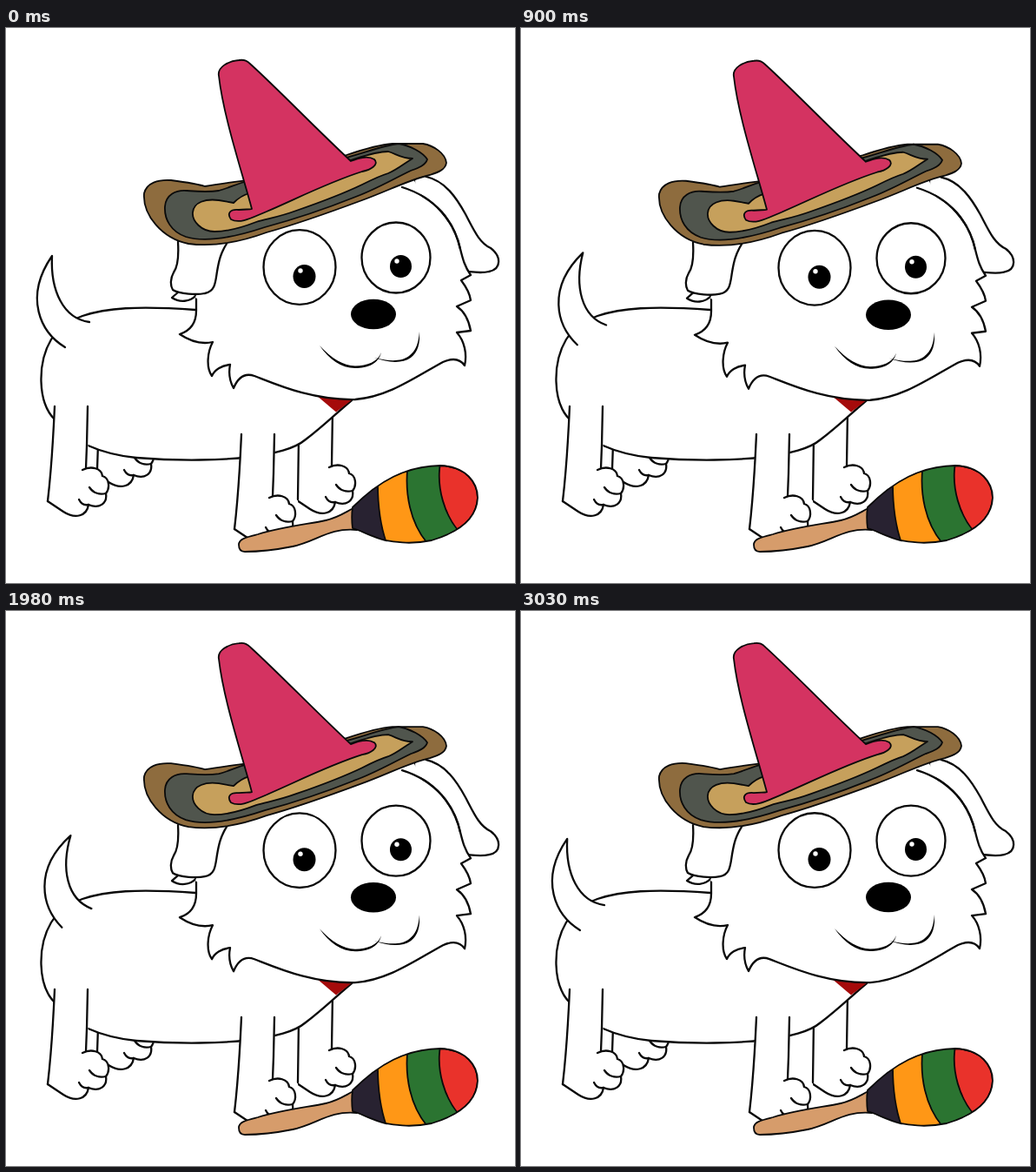
An HTML page that plays this animation: 586 px wide and 638 px high, repeating every 3060 ms.

```html
<!DOCTYPE html>
<html lang="en">
<head>
<meta charset="utf-8">
<title>Dog with sombrero</title>
<style>
html, body { margin: 0; width: 100%; height: 100%; overflow: hidden; background: #fff; }
svg { display: block; width: 586px; height: 638px; }
</style>
</head>
<body>
<svg viewBox="0 0 586 638" fill="#fff" stroke="#0a0a0a" stroke-width="2.3" stroke-linejoin="round" stroke-linecap="round">
  <defs>
    <g id="foot">
      <path d="M48 544L66 556C80 565 93 561 95 548C107 553 117 547 115 535C120 529 119 517 111 515C110 506 98 503 88 508"/>
      <path fill="none" d="M95 548C90 549 86 546 84 542M115 535C107 537 100 534 96 528"/>
    </g>
    <g id="leg">
      <path stroke="none" d="M56 434L48 544 95 540 94 434Z"/>
      <use href="#foot"/>
      <path fill="none" d="M56 435C54 480 52 510 48 544M94 435L93 480 92 506"/>
    </g>
    <path id="bulb" d="M399 551C430 520 460 504 500 503C530 504 543 523 543 540C542 565 520 580 490 589C465 594 450 591 437 589C420 585 410 578 399 575C398 567 398 558 399 551Z"/>
    <clipPath id="inside"><use href="#bulb"/></clipPath>
  </defs>

  <!-- far legs -->
  <use href="#foot" x="52" y="-34"/>
  <path d="M106 478L105 507"/>
  <path stroke="none" d="M337 470L336 541 378 530 376 440Z"/>
  <use href="#foot" x="284" y="-3"/>
  <path stroke="none" d="M330 530H336V545H330Z"/>
  <path fill="none" d="M337 470L336 542M376 440L375 503"/>

  <!-- body -->
  <path d="M218 324C150 319 115 322 88 331C70 338 59 347 52 358C36 385 36 430 56 450C70 474 110 490 150 494C200 498 250 497 280 493C310 489 332 484 345 473C365 458 380 443 398 428"/>
  <path fill="#a50b0b" stroke="none" d="M357 422L380 441.500 399 427V420Z"/>
  <path id="tail" d="M68 367C40 350 20 310 53 262C51 302 66 334 96 338"/>
  <use href="#leg"/>
  <use href="#leg" x="215" y="32"/>

  <g id="head">
    <path d="M470 160L484 171C506 176 519 196 529 214C539 233 545 247 558 253C570 262 571 277 556 280C548 282 541 281 532 280L470 200Z"/>
    <path d="M199 303L191 310C200 316 212 315 219 307"/>
    <path d="M456 183C495 195 516 223 523 254C526 266 528 274 535 284L524 290C530 298 534 305 535 313L519 320C528 326 533 337 535 348L519 350C528 360 531 375 528 388C522 379 512 380 503 384C470 402 440 424 402 427C352 428 312 410 286 400C275 396 267 402 262 414C257 405 256 397 258 387C248 388 240 393 237 400C230 390 232 372 238 361C225 364 212 360 200 352C212 348 219 340 219 325V307"/>
    <path stroke="none" d="M218 310L240 240 458 150 510 260 400 400Z"/>
    <path fill="none" d="M456 183C495 195 516 223 523 254"/>
    <path d="M198 246C199 262 198 274 193 281C189 288 189 296 192 301C200 306 220 307 229 305C241 303 241 292 243 280C245 268 247 259 254 248"/>
    <ellipse cx="338" cy="275" rx="41.500" ry="42.800"/>
    <ellipse cx="449" cy="264" rx="39.500" ry="40.500"/>
    <g stroke="none">
      <g fill="#000">
        <ellipse cx="343.500" cy="285.500" rx="13" ry="13.500"/>
        <ellipse cx="454.500" cy="274" rx="12.500" ry="13"/>
        <ellipse cx="423" cy="329" rx="26" ry="17.300"/>
        <path d="M361 365C375 380 388 388 402 388.500C416 388 428 384 432 373C429 386 416 391 402 391C386 391 372 381 361 365Z"/>
        <path d="M424 379C440 383 455 384 464 377C472 371 475 362 476 349C477 363 474 373 466 379C456 386 440 385 424 379Z"/>
      </g>
      <circle cx="339" cy="279" r="2.700"/>
      <circle cx="450" cy="268" r="2.700"/>
    </g>
    <g stroke-width="1.800">
      <path fill="#8e6c3e" d="M159 190C162 178 175 174 190 175C205 177 220 179 229 182C245 179 262 177 278 175L392 146C410 140 430 134 445 133L480 133C492 135 506 144 507 155C506 163 497 166 488 169C465 174 440 187 410 198C375 211 340 224 300 235C270 246 240 252 210 248C180 242 157 215 159 190Z"/>
      <path fill="#50554d" d="M183 205C184 192 195 186 208 187C222 188 232 189 245 187C256 184 266 179 278 176L392 149C420 141 435 135 452 133C465 135 480 143 485 151C483 158 474 161 466 164C445 174 425 186 400 195C370 207 335 219 298 229C265 240 230 247 207 240C190 234 182 220 183 205Z"/>
      <path fill="#c6a05c" d="M215 212C216 200 230 196 245 198L262 201C268 195 273 192 280 190L394 153C410 148 425 142 440 142C450 145 455 150 468 150C458 156 450 163 440 167C430 170 420 175 410 180C385 192 360 201 334 210C315 217 302 219 288 223C270 230 255 234 240 234C225 234 214 222 215 212Z"/>
      <path fill="#d43361" d="M245 55C243 45 256 38 268 37C275 36 278 38 282 42C317 74 352 111 397 153C405 150 416 146 424 151C430 157 420 163 410 165C372 177 335 196 300 211C285 217 270 226 259 220C254 213 258 208 268 209C275 208 280 209 283 208C270 160 250 100 245 55Z"/>
    </g>
  </g>

  <!-- maraca -->
  <g stroke-width="1.800">
    <path fill="#d69c6b" d="M268 594C268 587 278 585 290 582C320 573 350 570 368 566C382 563 390 557 400 552L404 577C372 574 358 590 330 596C310 600 290 602 275 602C270 602 268 599 268 594Z"/>
    <g clip-path="url(#inside)">
      <use href="#bulb" fill="#e9322b"/>
      <path fill="#2b7431" d="M500 500C495 530 506 560 520 577L500 600H390V500Z"/>
      <path fill="#ff9716" d="M463 500C458 535 466 570 485 592L470 600H390V500Z"/>
      <path fill="#282231" d="M428 524C428 550 431 572 438 592L390 600V500Z"/>
    </g>
    <use href="#bulb" fill="none"/>
  </g>
</svg>
<script>
const LOOP = 3060, STEP = 30;
const head = document.getElementById('head');
const tail = document.getElementById('tail');

// 0 to 1 and back within one period, easing out on both halves
function swing(time, period, rise, fall) {
  const x = time % period / period * 2;
  return x < 1 ? 1 - (1 - x) ** rise : (2 - x) ** fall;
}

function draw(now) {
  const t = Math.floor(now % LOOP / STEP) * STEP;
  const drop = 10 * swing(t, LOOP / 3, 1.2, 1.8);
  const angle = 20 * swing(t, LOOP / 4, 2, 2);
  head.setAttribute('transform', `translate(0 ${drop})`);
  tail.setAttribute('transform', `rotate(${angle} 80 350)`);
}

const start = performance.now();
function tick() {
  draw(performance.now() - start);
  requestAnimationFrame(tick);
}
tick();
</script>
</body>
</html>
```
